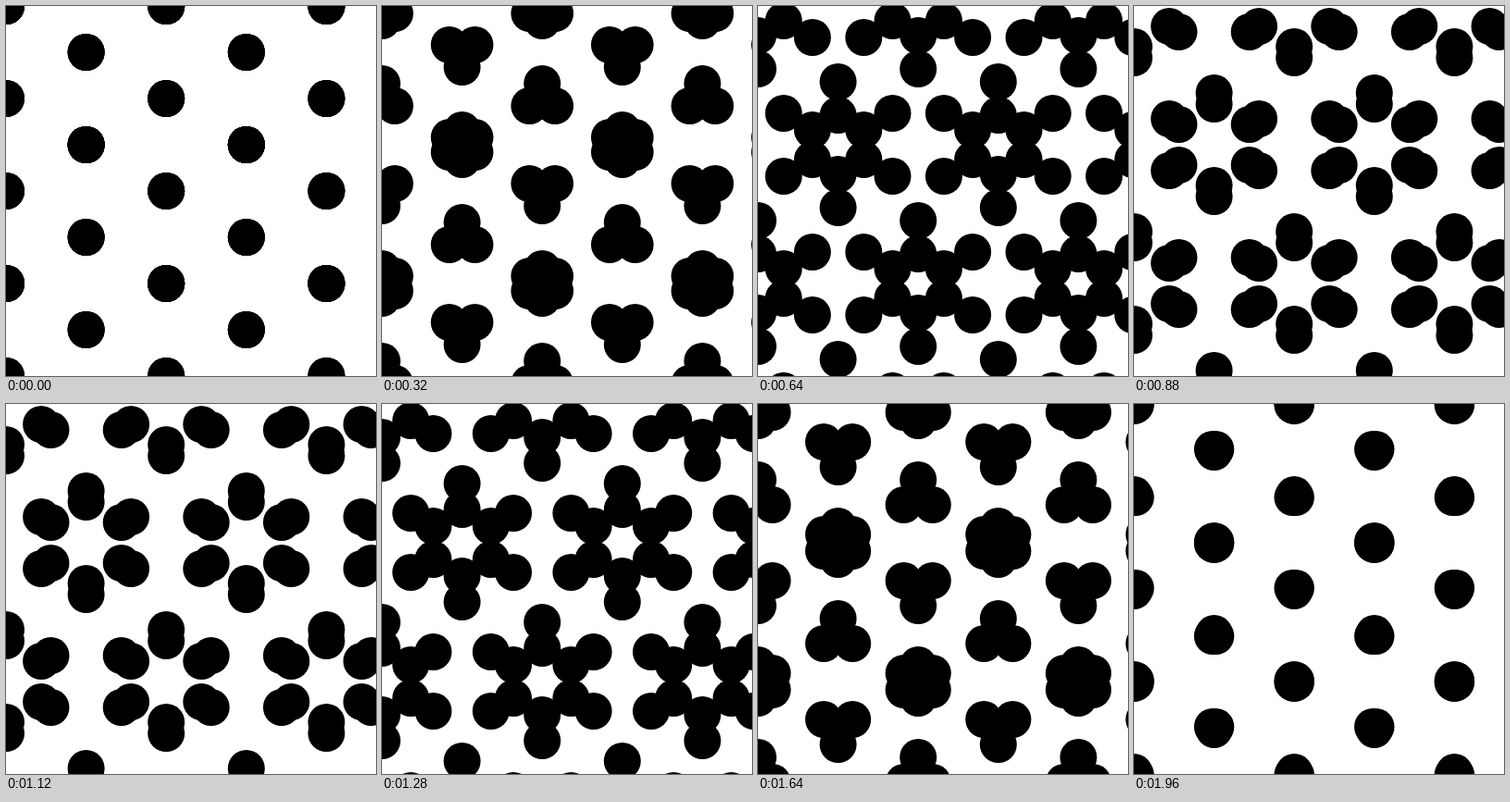
These frames come from a looping animation (400x400 px, 2000 ms). An HTML page with a canvas:

```html
<!DOCTYPE html>
<html lang="en">
<head>
<meta charset="utf-8">
<title>Hexagonal dots</title>
<style>
  html, body { margin: 0; width: 100%; height: 100%; overflow: hidden; background: #fff; }
  canvas { display: block; width: 400px; height: 400px; }
</style>
</head>
<body>
<canvas id="stage" width="400" height="400"></canvas>
<script>
const ctx = document.getElementById('stage').getContext('2d');
const SIZE = 400, LOOP = 2000, STEP = 40;
const EDGE = 100, RADIUS = 20;
const COL = EDGE * Math.sqrt(3) / 2, ROW = EDGE * 1.5;

function dot(x, y) {
  if (x < -RADIUS || y < -RADIUS || x > SIZE + RADIUS || y > SIZE + RADIUS) return;
  ctx.beginPath();
  ctx.arc(x, y, RADIUS, 0, Math.PI * 2);
  ctx.fill();
}

// Dots swap ends along the six spokes of every hub.
function hub(x, y, dist) {
  for (let k = 0; k < 6; k++) {
    const a = Math.PI / 2 + k * Math.PI / 3;
    const dx = Math.cos(a), dy = Math.sin(a);
    dot(x + dx * dist, y + dy * dist);
    dot(x + dx * (EDGE - dist), y + dy * (EDGE - dist));
  }
}

function draw(time) {
  const t = Math.floor((time % LOOP + 0.01) / STEP) * STEP % LOOP;
  const dist = EDGE * t / LOOP;
  ctx.fillStyle = '#fff';
  ctx.fillRect(0, 0, SIZE, SIZE);
  ctx.fillStyle = '#000';
  for (let j = -1; j <= 4; j++) {
    for (let i = -2; i <= 7; i++) {
      if ((i + j) % 2 === 0) hub(i * COL, j * ROW, dist);
    }
  }
}

let start = null;
function tick(now) {
  if (start === null) start = now;
  draw(now - start);
  requestAnimationFrame(tick);
}
draw(0);
requestAnimationFrame(tick);
</script>
</body>
</html>
```
